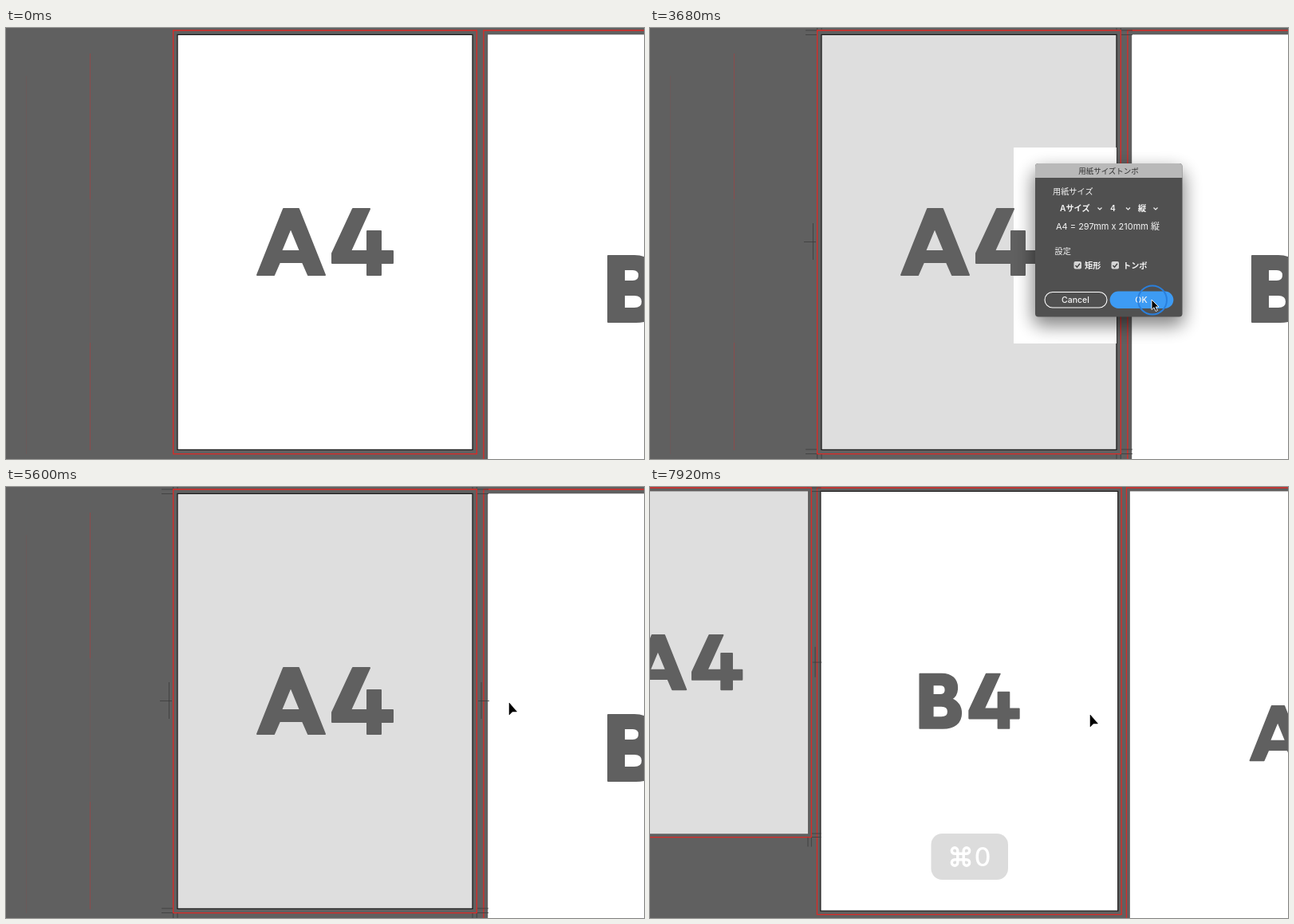
Write an HTML page that moves like this. It is 800x541 px and loops after 8000 ms.

```html
<!DOCTYPE html>
<html lang="ja">
<head>
<meta charset="utf-8">
<title>用紙サイズトンボ</title>
<style>
  html, body { margin: 0; width: 100%; height: 100%; overflow: hidden; background: #606060; }
  svg { display: block; width: 800px; height: 541px; }
  text { font-family: Inter, "Noto Sans CJK JP", "Noto Sans CJK", sans-serif; fill: #f4f4f4; }
  .line { fill: none; vector-effect: non-scaling-stroke; }
  .bleed { stroke: #dc2a26; stroke-width: 1.3; }
  .trim { stroke: #3c3c3c; stroke-width: .8; }
  .edge { stroke: #1c1c1c; stroke-width: 1.3; }
  .type { fill: #606060; fill-rule: evenodd; stroke: #606060; stroke-width: 2; stroke-linejoin: round; }
  .label { font-size: 10.2px; }
  .bold { font-weight: 600; }
  .button { fill: none; stroke: #fff; }
</style>
</head>
<body>
<svg viewBox="0 0 800 541">
  <defs>
    <filter id="blur" x="-30%" y="-30%" width="160%" height="160%"><feGaussianBlur stdDeviation="11"/></filter>
    <path id="A" d="M1 84 34 1H53L86 84H65L58 68H29L22 84ZM43 25 31 54H55Z"/>
    <path id="4" d="M27 1H48L24 54H45V29H62V54H77V69H62V84H45V69H1V57Z"/>
    <path id="B" d="M1 1H34C50 1 58 10 58 22C58 31 54 37 49 39C58 43 64 50 64 61C64 76 53 84 36 84H1Z
      M21 18V33H32Q40 33 40 25.5T32 18ZM21 50V67H34Q44 67 44 58.500T34 50Z"/>
    <path id="cmd" d="M4 4V-8a4 4 0 1 1 4 4H-8a4 4 0 1 1 4-4V8a4 4 0 1 1-4-4H8a4 4 0 1 1-4 4Z"
      transform="scale(.93)" fill="none" stroke="#fff" stroke-width="3.7"/>
  </defs>

  <rect width="800" height="541" fill="#606060"/>
  <g id="guides" stroke="#b83838">
    <path d="M105.500 32V215M105.500 395V530" opacity=".5"/>
    <path d="M105.500 215V395M25.500 60V535" opacity=".13"/>
  </g>

  <g id="world">
    <g id="pages"></g>
    <rect id="patch" x="456" y="150" width="129" height="246" fill="#fff"/>
    <g id="marks" class="trim"></g>
    <g class="type">
      <use href="#A" x="314" y="226"/><use href="#4" x="408" y="226"/>
      <use href="#B" x="754" y="285"/><use href="#4" x="829" y="285"/>
      <use href="#A" x="1256" y="334"/>
    </g>
  </g>

  <g id="dialog">
    <rect x="480" y="178" width="190" height="196" rx="12" opacity=".48" filter="url(#blur)"/>
    <rect x="483" y="170" width="184.500" height="192.500" rx="4" fill="#505050"/>
    <path d="M483 188V174a4 4 0 0 1 4-4H663.500a4 4 0 0 1 4 4V188Z" fill="#b9b9b9"/>
    <text x="575" y="182.500" text-anchor="middle" font-size="9.5" style="fill:#303030">用紙サイズトンボ</text>
    <text class="label" x="505" y="208.500">用紙サイズ</text>
    <g id="fields" fill="#434343">
      <rect x="509" y="218" width="61" height="17"/>
      <rect x="573" y="218" width="32" height="17"/>
      <rect x="608" y="218" width="34" height="17"/>
    </g>
    <text class="label bold" x="514" y="230">Aサイズ</text>
    <text class="label bold" x="577" y="230" font-size="11">4</text>
    <text class="label bold" x="612" y="230">縦</text>
    <path d="M561.500 225.500l2.500 2.500 2.500-2.500M597 225.500l2.500 2.500 2.500-2.500M631.500 225.500l2.500 2.500 2.500-2.500" fill="none" stroke="#eee" stroke-width="1.2"/>
    <text x="509" y="252.500" font-size="11">A4 = 297mm x 210mm 縦</text>
    <text class="label" x="507.500" y="284">設定</text>
    <g fill="#d6d6d6"><rect x="531.500" y="293" width="9.500" height="9.500" rx="2"/><rect x="578.500" y="293" width="9.500" height="9.500" rx="2"/></g>
    <path d="M533.500 298l2 2.200 3.500-4.500M580.500 298l2 2.200 3.500-4.500" fill="none" stroke="#404040" stroke-width="1.4"/>
    <text class="label bold" x="545" y="302">矩形</text>
    <text class="label bold" x="593" y="302">トンボ</text>
    <rect class="button" x="495" y="331.500" width="78" height="19.500" rx="9.750" stroke-width="1.1"/>
    <rect id="ok" class="button" x="577.500" y="331.500" width="78" height="19.500" rx="9.750" stroke-width="1.8"/>
    <g text-anchor="middle" font-size="10.500" font-weight="500">
      <text x="533.500" y="345">Cancel</text><text x="616" y="345">OK</text>
    </g>
    <circle id="ring" cx="630" cy="341.500" r="18" fill="none" stroke="#2a7fdc" stroke-width="2"/>
  </g>

  <g id="badge">
    <rect id="key" y="435" height="58" rx="14" fill="#414141"/>
    <use id="sign" href="#cmd" y="464"/>
    <text id="zero" x="417" y="475.500" text-anchor="middle" font-size="32" font-weight="500" style="fill:#fff">0</text>
  </g>

  <g id="cursor">
    <path id="arrow" d="M0 0V12.500L3 9.800 5.200 14.500 7.300 13.500 5.200 9H9Z" fill="#000" stroke="#fff" stroke-width=".9"/>
    <path id="tool" d="M0 0V15L4 11H9.500Z" stroke="#000"/>
  </g>
</svg>
<script>
const LOOP = 8000, STEP = 80;
const NS = 'http://www.w3.org/2000/svg';
const $ = id => document.getElementById(id);

function add(parent, tag, attrs) {
  const el = document.createElementNS(NS, tag);
  for (const k in attrs) el.setAttribute(k, attrs[k]);
  return $(parent).appendChild(el);
}
const box = (cls, x, y, w, h, more) =>
  add('pages', 'rect', { class: cls, x, y, width: w, height: h, ...more });

// A4, B4 and A3 artboards, each with its bleed line
const BLEED = 5.3;
const pages = [[215, 370, 521], [604.2, 452, 638.5], [1074.5, 523, 737]].map(([x, w, h]) => {
  box('line bleed', x - BLEED, 8.3 - BLEED, w + 2 * BLEED, h + 2 * BLEED);
  return {
    fill: box('', x, 8.3, w, h, { fill: '#fff' }),
    edge: box('line edge', x, 8.3, w, h)
  };
});

// Trim marks round the A4 sheet
for (const y of [3, 8.5, 529, 534.5])
  add('marks', 'path', { class: 'line', d: `M195 ${y}h14M591 ${y}h14` });
for (const x of [209.7, 215, 585, 590.3])
  add('marks', 'path', { class: 'line', d: `M${x} -12v14M${x} 535v14` });
add('marks', 'path', { class: 'line', d: 'M193 268.500h15M204.500 245v46M592 268.500h14M596 245v46' });

// [time, x, y] of the pointer tip
const track = [
  [1600, 700, 330], [2080, 535, 229], [2240, 540, 229], [2480, 590, 230],
  [2640, 622, 231], [2960, 622, 231], [3520, 629, 341], [5120, 629, 341],
  [5600, 631, 271], [7440, 631, 271], [7920, 552, 286]
];

const ease = p => p * p * (3 - 2 * p);

function pointAt(t) {
  const i = track.findIndex(k => k[0] > t);
  if (i < 0) return track[track.length - 1].slice(1);
  if (!i) return track[0].slice(1);
  const [a, b] = [track[i - 1], track[i]];
  const p = ease((t - a[0]) / (b[0] - a[0]));
  return [a[1] + (b[1] - a[1]) * p, a[2] + (b[2] - a[2]) * p];
}

const show = (el, on) => { el.style.display = on ? '' : 'none'; };

function draw(t) {
  const within = (a, b) => t >= a && t < b;
  const zoomed = t >= 7040;
  const combo = t >= 6960;
  const pressed = within(3600, 3920);
  const active = t < 5760 ? 0 : 1;

  $('world').setAttribute('transform', zoomed ? 'translate(-284.6 -1.45) scale(.825)' : '');
  show($('guides'), !zoomed);
  pages.forEach((p, i) => show(p.edge, i === active));
  pages[0].fill.setAttribute('fill', t < 3680 ? '#fff' : '#dedede');
  show($('patch'), within(3680, 3920));
  show($('marks'), t >= 3680);

  show($('dialog'), within(1200, 3920));
  show($('fields'), within(1920, 3120));
  show($('ring'), pressed);
  $('ok').style.fill = pressed ? '#3d9bf4' : 'none';
  $('ok').style.stroke = pressed ? '#3d9bf4' : '#fff';

  show($('badge'), t >= 6560);
  $('badge').style.opacity = t < 7440 ? 1 : 1 - .82 * (t - 7440) / 480;
  $('key').setAttribute('x', combo ? 352.5 : 363.5);
  $('key').setAttribute('width', combo ? 96.500 : 73.500);
  $('sign').setAttribute('x', combo ? 389.500 : 400);
  show($('zero'), combo);

  const [x, y] = pointAt(t);
  show($('cursor'), t >= 1600);
  $('cursor').setAttribute('transform', `translate(${x} ${y})`);
  show($('arrow'), t < 3920);
  show($('tool'), t >= 3920);
  $('tool').setAttribute('fill', within(6560, 7440) ? '#fff' : '#000');
  $('tool').setAttribute('stroke-width', within(6560, 7440) ? 1 : .5);
}

const start = performance.now();
function tick() {
  const t = (performance.now() - start) % LOOP;
  draw(Math.floor(t / STEP) * STEP);
  requestAnimationFrame(tick);
}
tick();
</script>
</body>
</html>
```
